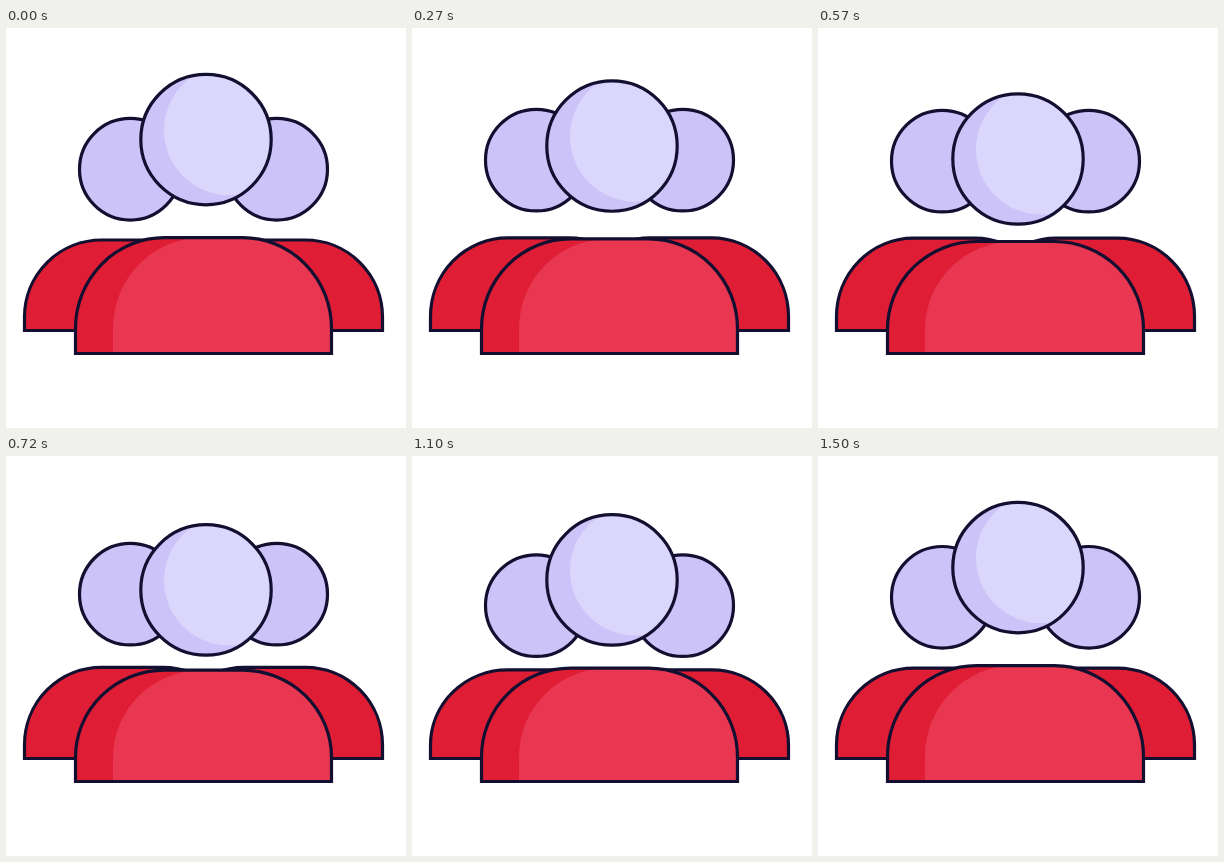
Write an HTML page with a canvas that moves like this. It is 400 px wide and 400 px high and loops after 1520 ms.

```html
<!DOCTYPE html>
<html lang="en">
<head>
<meta charset="utf-8">
<style>
  html, body { margin: 0; width: 100%; height: 100%; overflow: hidden; background: #fff; }
  canvas { display: block; width: 400px; height: 400px; }
</style>
</head>
<body>
<canvas id="stage" width="400" height="400"></canvas>
<script>
const ctx = document.getElementById('stage').getContext('2d');
const LOOP = 1520, SWING = 1500, SIDE_DELAY = 400;
const INK = '#120f30', LILAC = '#ccc3f8', PALE = '#dbd7fc', RED = '#df1e36', ROSE = '#e93651';

function circle(x, y, r) {
  const path = new Path2D();
  path.arc(x, y, r, 0, Math.PI * 2);
  return path;
}

// Shoulders: flat base, two rounded upper corners that squash with the height.
function dome(left, right, top, bottom, rx, ry) {
  const path = new Path2D();
  path.moveTo(left, bottom);
  path.lineTo(left, top + ry);
  path.ellipse(left + rx, top + ry, rx, ry, 0, Math.PI, Math.PI * 1.5);
  path.lineTo(right - rx, top);
  path.ellipse(right - rx, top + ry, rx, ry, 0, -Math.PI / 2, 0);
  path.lineTo(right, bottom);
  path.closePath();
  return path;
}

function paint(shape, fill, light, lightFill) {
  ctx.fillStyle = fill;
  ctx.fill(shape);
  if (light) {
    ctx.save();
    ctx.clip(shape);
    ctx.fillStyle = lightFill;
    ctx.fill(light);
    ctx.restore();
  }
  ctx.stroke(shape);
}

function draw(time) {
  const t = Math.min(time % LOOP, SWING);
  const wave = delay => -Math.cos((t - delay) / SWING * Math.PI * 2);
  const front = wave(0), side = wave(SIDE_DELAY);

  ctx.fillStyle = '#fff';
  ctx.fillRect(0, 0, 400, 400);
  ctx.strokeStyle = INK;
  ctx.lineWidth = 3.2;

  const sideTop = 211.8 + 2.2 * side;
  const sideRy = 77 * (302.5 - sideTop) / 90.7;
  paint(dome(18.5, 234, sideTop, 302.5, 77, sideRy), RED);
  paint(dome(161, 376.5, sideTop, 302.5, 77, sideRy), RED);

  const sideY = 140.3 + 9.5 * side;
  paint(circle(124.3, sideY, 50.8), LILAC);
  paint(circle(270.7, sideY, 50.8), LILAC);

  const top = 211.9 + 2.2 * front;
  const ry = 89 * (325.5 - top) / 113.6;
  paint(dome(69.5, 325.5, top, 325.5, 89, ry), RED,
        dome(107, 420, top, 325.5, 89, ry), ROSE);

  const headY = 122.8 + 11.2 * front;
  paint(circle(200, headY, 65.2), LILAC, circle(223, headY - 9.5, 65), PALE);
}

function tick() {
  draw(performance.now());
  requestAnimationFrame(tick);
}
tick();
</script>
</body>
</html>
```
